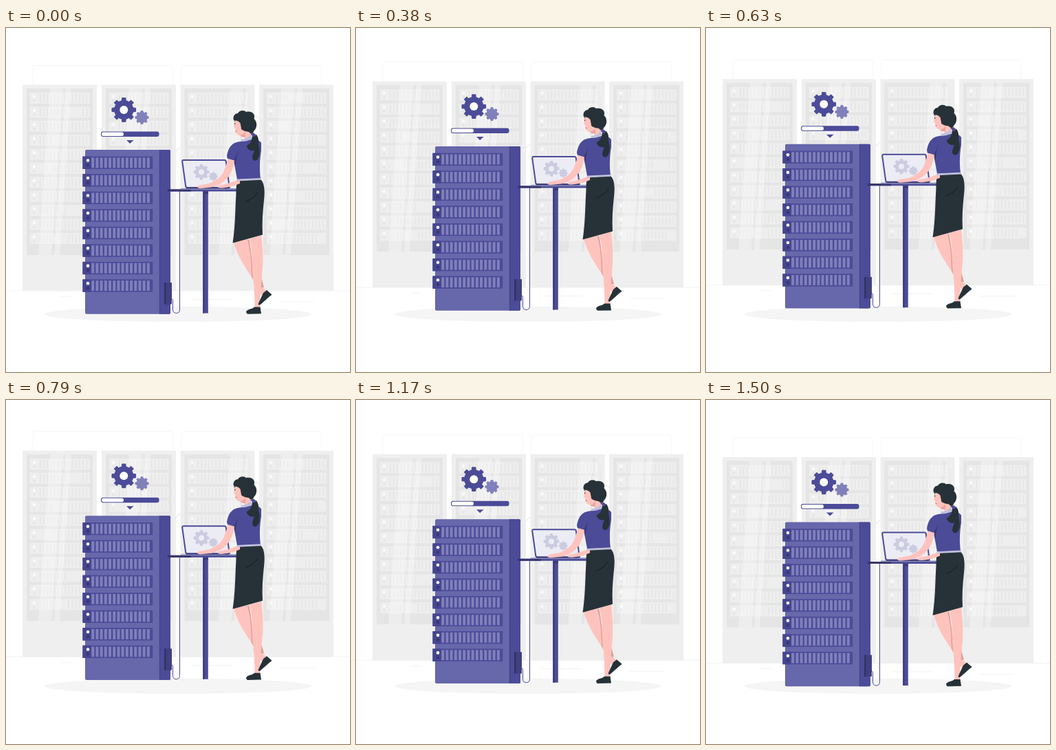
Recreate the animation shown at these times as an HTML page. Size 500 px wide and 500 px high, loop 1540 ms.

```html
<!DOCTYPE html>
<html lang="en">
<head>
<meta charset="utf-8">
<title>Server room</title>
<style>
  html, body { margin: 0; width: 100%; height: 100%; overflow: hidden; background: #fff; }
  svg { display: block; width: 100%; height: 100%; }
</style>
</head>
<body>
<svg viewBox="0 0 500 500">
  <ellipse cx="250" cy="416" rx="194" ry="11.2" fill="#f5f5f5"/>
  <g id="scene">
    <g fill="none" stroke="#f7f7f7">
      <rect x="39" y="54.5" width="203.500" height="327" rx="4"/>
      <rect x="255" y="54.500" width="203.500" height="327" rx="4"/>
      <path d="M0 382H500M80 390h14M270 394.500h58M398 398h50" stroke="#f2f2f2"/>
    </g>
    <g id="racks"></g>
    <path d="M246 180l7-6M361 126l7 5" stroke="#e4e4e4"/>

    <g id="server">
      <rect x="115" y="177" width="124" height="238.700" rx="2" fill="#6767ab"/>
      <path d="M223 177h14q2 0 2 2v234.700q0 2-2 2h-14z" fill="#4b4b98"/>
      <path d="M223.300 177v238.700" stroke="#40407f" stroke-width=".7"/>
    </g>
    <g id="units"></g>
    <path d="M241 394q1.500 0 1.500 2v13q0 5.500 5 5.500t5-5.500V238q0-4 4-4h8" fill="none" stroke="#4b4b98"/>
    <rect x="230" y="370" width="11" height="31.500" rx=".8" fill="#40407f"/>
    <path d="M230 370h2.500v31.500h-2.500z" fill="#32326a"/>

    <g id="status">
      <rect x="138" y="150.500" width="84.500" height="7.500" rx="3" fill="#4b4b98"/>
      <rect x="139" y="151.500" width="32" height="5.500" rx="2.500" fill="#fff"/>
      <path d="M175 163h10.500l-5.300 5z" fill="#4b4b98"/>
    </g>

    <g id="desk">
      <path d="M286.300 237h7.500v177.500h-7.500z" fill="#4b4b98"/>
      <path d="M286.300 237h2.200v177.500h-2.200zM286.300 237h7.500v4h-7.500z" fill="#3a3a78"/>
      <path d="M235 234.500h103v3H235z" fill="#4b4b98"/>
      <path d="M235 234.500h34v3h-34z" fill="#35356c"/>
      <path d="M258 192h59.500q2 0 2.300 2l5 38H263.500q-2 0-2.300-2l-5-36q-.2-2 1.800-2z" fill="#ececf5" stroke="#4b4b98" stroke-width="2"/>
      <path d="M254 233h84v1.700h-84z" fill="#8e8eb8"/>
      <path d="M262 231.500h62v2h-62z" fill="#40407f"/>
    </g>
    <g id="gears"></g>

    <g id="woman">
      <path d="M331 311L351 306C357 325 359 350 364 362C369 371 374 379 379 383L372 390C367 379 362 371 355 359C345 344 336 330 331 311Z" fill="#ffc3bd"/>
      <path d="M353 307C358 328 358 350 359 366L357 361C356 345 357 330 351 308ZM371 363L375 377 370 377Z" fill="#dfa19b"/>
      <path d="M354 306L371 301C374 325 374 345 371.500 365C370 385 369 395 369.500 407L361.500 407C362 380 357 350 357.500 330C357 320 356 315 354 306Z" fill="#ffc3bd"/>
      <g fill="#263238">
        <path d="M349 412C352 408 358 409 361 405.500L369.500 405.500 371 415.300 351 415.700Q349 415 349 412Z"/>
        <path d="M367 400L374 385 379 381 386.500 387.500C382 391 376 397 369 402.500Q366 403 367 400Z"/>
        <path d="M336 222L370 220C376 225 376.500 238 375 250C373 268 372 284 373 300.500L329.500 312.500C333 290 333 270 334 250C335 238 334 230 336 222Z"/>
      </g>
      <path d="M349 252C357 249 362 245 366 239" fill="none" stroke="#121a1e"/>

      <path d="M340 220L322 226 309 229C306 231 308 233 315 232.500L330 230 340 226Z" fill="#ffc3bd"/>
      <path d="M341 165C331 166 324 170 321 186L322 190 331 193 336 220 370 219C368 203 369 190 371 178L371 167C368 162 360 161 356 162Z" fill="#4b4b98"/>
      <path d="M337 179Q334 188 331 192L333 201Z" fill="#3a3a78"/>
      <path d="M335.500 219.700L370.500 218 371 220.700 335.700 222.500Z" fill="#c0c0dc"/>
      <path d="M323 190L318 205C314 216 306 222 295 226L281 228.500C276 231 278 233 284 233L298 231.500C310 229 320 223 326 212C329 206 331 200 332 192.500Z" fill="#ffc3bd"/>

      <path d="M332 134C333 138 331 142 331.500 145L333 146C333 151 335 155 340 156.500L347 155 347 164 357 162 356 149 352 132Z" fill="#ffc3bd"/>
      <path d="M340 156.500Q345 155 348 151L348 159Q343 159 340 156.500Z" fill="#e9a7a0"/>
      <path d="M342 162Q350 161 355 156L359 160Q352 165 342 165Z" fill="#c0c0dc"/>
      <path d="M332.700 138v2.200M331.500 135.500l2-.8" stroke="#263238"/>
      <path d="M333.500 150l2 .4" stroke="#c9605c"/>
      <g fill="#263238">
        <path d="M331 134C329 127 334 124 337 124C339 119 347 119 349 122C357 120 363 125 360.500 132C366 137 365 146 360 150C359 155 355 154 353 151C347 150 341 149 340 142C341 136 338 135 331 134Z"/>
        <path d="M358 156L364 155C369 162 366 165 368 173C370 182 368 192 362 193C355 191 359 184 361 178C356 180 349 175 350 171C355 169 358 163 358 156Z"/>
      </g>
      <path d="M340.500 138Q337 138 338 143Q339 147 342 146Z" fill="#ffc3bd"/>
      <path d="M355 154L360 152.500 364 156 360 158.500Z" fill="#4b4b98"/>
    </g>
  </g>
</svg>
<script>
  const LOOP = 1540, STEPS = 37, RISE = 10;
  const byId = id => document.getElementById(id);
  const rect = (x, y, w, h, fill, extra = '') =>
    `<rect x="${x}" y="${y}" width="${w}" height="${h}" fill="${fill}" ${extra}/>`;
  const circle = (x, y, r, fill) => `<circle cx="${x}" cy="${y}" r="${r}" fill="${fill}"/>`;
  const repeat = (n, make) => Array.from({ length: n }, (_, i) => make(i)).join('');

  function gear(x, y, outer, inner, fill, hole, holeFill) {
    const points = [];
    for (let tooth = 0; tooth < 8; tooth++) {
      for (const [turn, r] of [[-.27, inner], [-.19, outer], [.19, outer], [.27, inner]]) {
        const a = (tooth + turn) * Math.PI / 4;
        points.push(`${(x + r * Math.sin(a)).toFixed(2)},${(y - r * Math.cos(a)).toFixed(2)}`);
      }
    }
    return `<polygon points="${points.join(' ')}" fill="${fill}" stroke="${fill}" stroke-linejoin="round"/>` +
      (hole ? circle(x, y, hole, holeFill) : '');
  }

  function rack(x, sheen) {
    const shelf = row => {
      const y = 94 + row * 20.4;
      const slots = repeat(14, i =>
        (row * 5 + x + (i >> 2) * 3) % 7 ? rect(x + 25 + i * 5.2, y + 2, 1.3, 12, '#e4e4e4') : '');
      return rect(x + 11, y, 86.5, 16, '#eee') + slots +
        circle(x + 17, y + 5.5, 2.2, '#fafafa') + circle(x + 17, y + 11.5, 1.8, '#e6e6e6');
    };
    const glare = (left, width) =>
      `<path d="M${left} 88h${width}l-17 242h${-width}z" fill="#fff" opacity=".3"/>`;
    return rect(x, 82.5, 108, 299.5, '#efefef') + rect(x + 6, 88, 96, 242, '#e5e5e5') +
      repeat(11, shelf) + glare(x + sheen, 19) + glare(x + sheen + 23, 8);
  }

  function unit(i) {
    const y = 186.7 + i * 25.53;
    return rect(111.5, y, 101.7, 18.3, '#4b4b98') + rect(111.5, y, 11.5, 18.3, '#454590') +
      repeat(14, n => rect(124.3 + n * 6.2, y + 1.8, 3.9, 14.8, '#8080bb')) +
      circle(119, y + 5.8, 2.3, '#fff') + circle(119, y + 12.6, 2.1, '#36366f');
  }

  byId('racks').innerHTML = [[24, 40], [139, 40], [253.5, 72], [368, 32]].map(r => rack(...r)).join('');
  byId('units').innerHTML = repeat(8, unit);
  byId('gears').innerHTML =
    gear(171.3, 119, 17.5, 13.8, '#4b4b98', 6, '#fff') +
    gear(197.5, 130, 9.6, 7.6, '#8080bb') +
    gear(284, 209.3, 11, 8.6, '#cbcbe1', 4, '#ececf5') +
    gear(301.3, 215.8, 6, 4.7, '#cbcbe1');

  // A linear rise and fall, held at 24 poses a second.
  function draw(now) {
    const step = Math.floor(((now + 4) % LOOP) / LOOP * STEPS);
    const phase = (step + 1) / STEPS;
    const y = .5 - RISE * (1 - Math.abs(1 - 2 * phase));
    byId('scene').setAttribute('transform', `translate(0 ${y.toFixed(3)})`);
  }

  let start;
  function tick(now) {
    start ??= now;
    draw(now - start);
    requestAnimationFrame(tick);
  }
  draw(0);
  requestAnimationFrame(tick);
</script>
</body>
</html>
```
